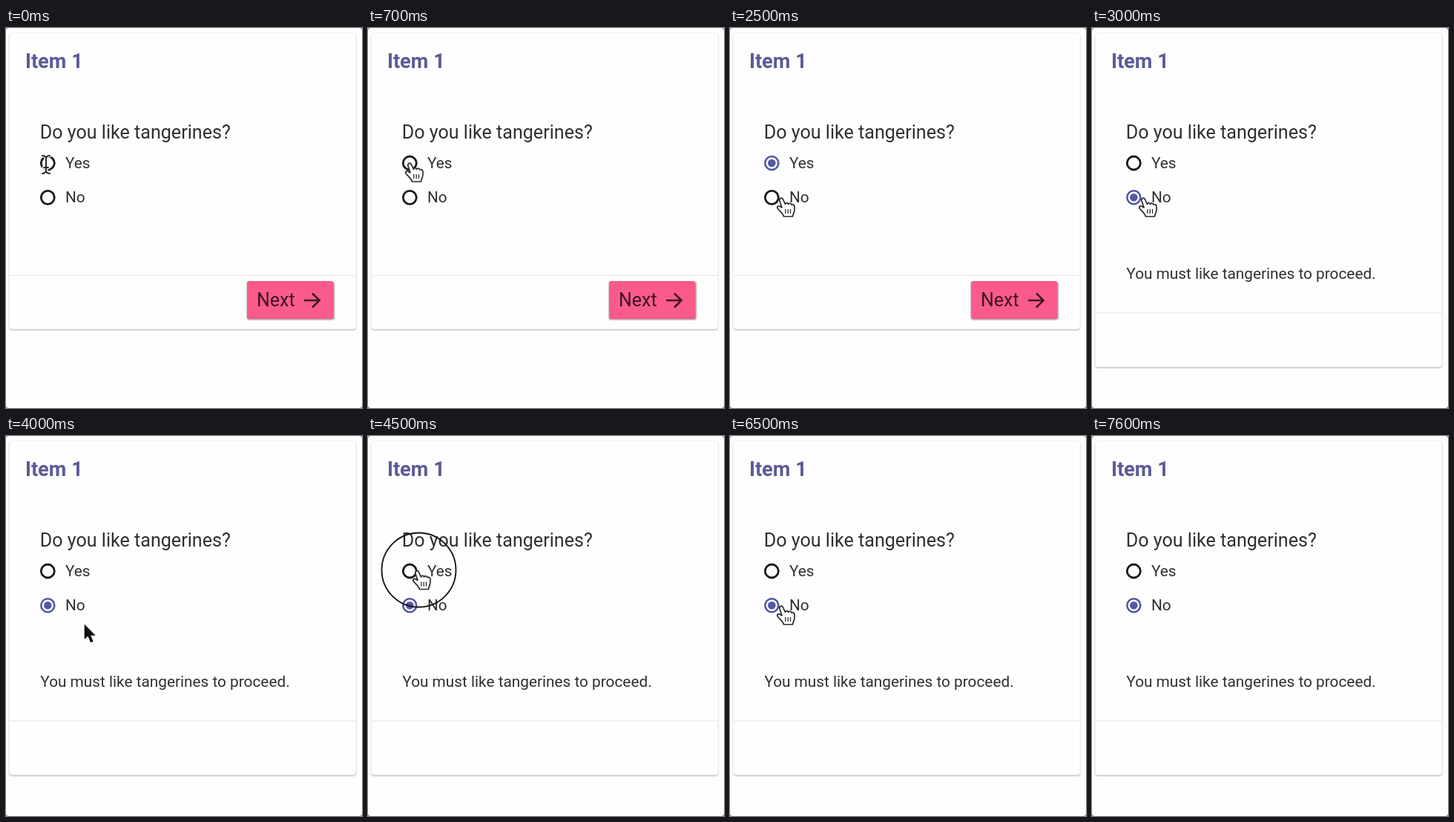
Write an HTML page that moves like this. It is 480 by 512 pixels and loops after 8 s.

```html
<!DOCTYPE html>
<html lang="en">
<head>
<meta charset="utf-8">
<title>Questionnaire</title>
<style>
html, body { margin: 0; width: 100%; height: 100%; overflow: hidden; background: #8c8c8c; }
svg { display: block; width: 100vw; height: 100vh; }
text { font-family: Roboto, sans-serif; fill: #303030; }
.title { font-size: 27.2px; font-weight: 700; fill: #5b5b98; }
.question { font-size: 25.1px; }
.body { font-size: 20.8px; }
.next { font-size: 25px; fill: #3d1424; }
</style>
</head>
<body>
<svg viewBox="0 0 480 512" xmlns="http://www.w3.org/2000/svg">
  <defs>
    <filter id="soft" x="-10%" y="-10%" width="120%" height="120%"><feGaussianBlur stdDeviation=".8"/></filter>
    <path id="bar" d="M-5 -12Q-1 -12 0 -9Q1 -12 5 -12M0 -9V9M-5 12Q-1 12 0 9Q1 12 5 12M-3 4H3"/>
  </defs>
  <rect width="480" height="512" rx="4" fill="#fefefe"/>
  <rect id="shade" x="4.5" y="8" width="467.5" height="399" rx="4" fill="#b4b4b4" filter="url(#soft)"/>
  <rect id="card" x="4.500" y="6.500" width="467.500" height="399" rx="4" fill="#fefefe" stroke="#f0f0f0"/>
  <path id="rule" d="M5 0H472" stroke="#e6e6e6" stroke-width="1.2"/>

  <text class="title" x="26" y="54">Item 1</text>
  <text class="question" x="45.8" y="149">Do you like tangerines?</text>
  <g id="yes"><circle class="ring" cx="56.3" cy="182" r="9" fill="none"/><circle class="dot" cx="56.3" cy="182" r="5.3" fill="#5358a4"/></g>
  <text class="body" x="80" y="189">Yes</text>
  <g id="no"><circle class="ring" cx="56.3" cy="228.3" r="9" fill="none"/><circle class="dot" cx="56.3" cy="228.3" r="5.3" fill="#5358a4"/></g>
  <text class="body" x="80" y="235">No</text>
  <text id="message" class="body" x="46.3" y="337.5">You must like tangerines to proceed.</text>

  <g id="next">
    <rect x="325" y="342" width="117.5" height="51" rx="3" fill="#8f7a82" filter="url(#soft)"/>
    <rect x="325" y="341" width="116" height="51" rx="3" fill="#fb5b8b"/>
    <text class="next" x="338" y="375">Next</text>
    <path d="M402 367H422M413 357.5L422.7 367L413 376.5" fill="none" stroke="#3d1424" stroke-width="2.5"/>
  </g>

  <circle id="press" r="50" fill="none" stroke="#111" stroke-width="1.8"/>
  <g id="cursor">
    <g id="beam" fill="none" stroke-linecap="round">
      <use href="#bar" stroke="#fff" stroke-width="4.6"/>
      <use href="#bar" stroke="#222" stroke-width="1.9"/>
    </g>
    <g id="hand" fill="#fff" stroke="#2a2a2a" stroke-width="1.7" stroke-linejoin="round" stroke-linecap="round">
      <path d="M-4.500 5C-5.500 1 -1.500 0 0 3L3 9.500C3.500 7 6.500 7 7 9.500C8 7.500 11 8 11.300 10C13 9 15.500 10 15.500 12.500V16.500C15.500 20.500 13.500 22 13 26H1C.5 23 -3 20 -7 15.500C-9 13 -6.500 11 -4 12.500L-1.500 14Z"/>
      <path d="M3.300 16.500V21.500M6.700 16.500V21.500M10 16.500V21.500" fill="none" stroke-width="1.3"/>
    </g>
    <path id="arrow" d="M0 0V20.500L4.800 16.200L8.300 24.800L12 23.200L8.500 15.200H15Z" fill="#111" stroke="#fff" stroke-width="1.7" paint-order="stroke"/>
  </g>
</svg>
<script>
const LOOP = 8000, STEP = 100;
const $ = id => document.getElementById(id);

// Each stretch of cursor travel: time, x, y; it is hidden outside them.
const trips = [
  [[0, 54, 184], [100, 54, 184], [600, 58.5, 181], [1900, 58.5, 181], [2500, 71.5, 228], [3500, 71.5, 228]],
  [[3900, 110, 262], [4400, 68.5, 180.5], [5400, 68.5, 180.5], [5700, 70, 212], [6000, 71.5, 228],
   [7300, 71.5, 228], [7500, 193, 398], [7600, 193, 398]]
];
const presses = [[800, 1000], [2900, 3000], [4400, 4600], [6200, 6300]];
const choices = [[0, ""], [1000, "yes"], [3000, "no"], [4600, "yes"], [6300, "no"]];

const show = (id, on) => $(id).setAttribute("display", on ? "inline" : "none");
const ease = p => p * p * (3 - 2 * p);

function cursorAt(t) {
  const trip = trips.find(k => t >= k[0][0] && t < k[k.length - 1][0]);
  if (!trip) return null;
  const i = trip.findIndex(k => k[0] > t);
  const [t0, x0, y0] = trip[i - 1], [t1, x1, y1] = trip[i];
  const p = ease((t - t0) / (t1 - t0));
  return { x: x0 + (x1 - x0) * p, y: y0 + (y1 - y0) * p };
}

function cursorKind(t, c) {
  if (t < 300) return "beam";
  const overRadio = c.x < 80 && (Math.abs(c.y - 182) < 14 || Math.abs(c.y - 228) < 14);
  return overRadio ? "hand" : "arrow";
}

function setRadio(id, on) {
  const ring = $(id).querySelector(".ring");
  ring.setAttribute("stroke", on ? "#5358a4" : "#1a1a1a");
  ring.setAttribute("stroke-width", on ? 2.6 : 2.8);
  $(id).querySelector(".dot").setAttribute("display", on ? "inline" : "none");
}

function draw(now) {
  const t = Math.floor(now % LOOP / STEP) * STEP;
  const choice = choices.filter(c => c[0] <= t).pop()[1];
  const refused = choice === "no";

  setRadio("yes", choice === "yes");
  setRadio("no", refused);
  show("message", refused);
  show("next", !refused);
  for (const id of ["card", "shade"]) $(id).setAttribute("height", refused ? 450 : 399);
  $("rule").setAttribute("transform", `translate(0 ${refused ? 384 : 333.5})`);

  const c = cursorAt(t);
  show("cursor", c);
  show("press", c && presses.some(([a, b]) => t >= a && t < b));
  if (!c) return;
  const place = `translate(${c.x} ${c.y})`;
  $("cursor").setAttribute("transform", place);
  $("press").setAttribute("transform", place);
  const kind = cursorKind(t, c);
  for (const id of ["beam", "hand", "arrow"]) show(id, id === kind);
}

const start = performance.now();
function tick() {
  draw(performance.now() - start);
  requestAnimationFrame(tick);
}
tick();
</script>
</body>
</html>
```
